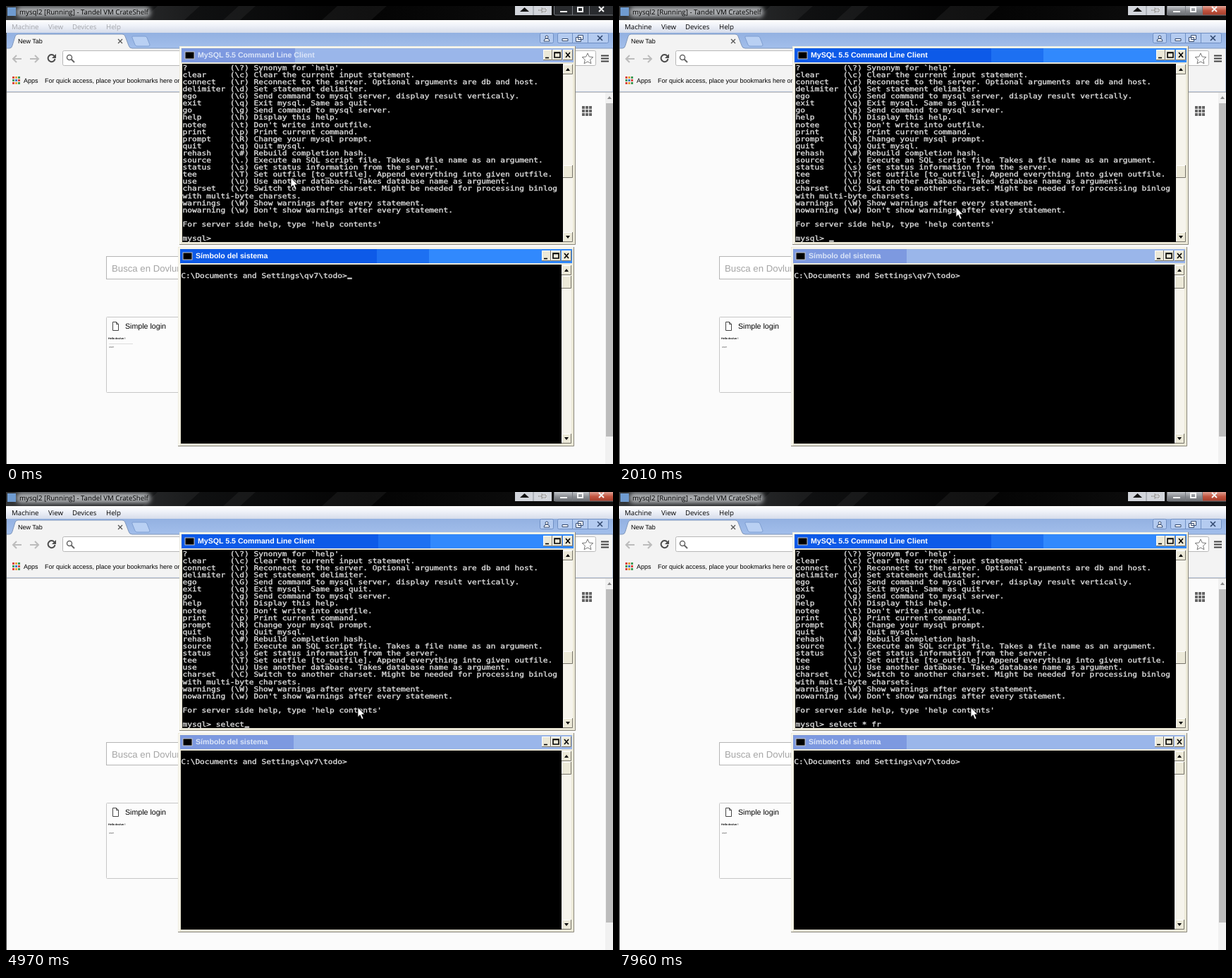
Animation, 861 px wide and 650 px high, one loop 8000 ms. Source, as an HTML page:

```html
<!DOCTYPE html>
<html lang="en">
<head>
<meta charset="utf-8">
<title>Console session</title>
<style>
html, body { margin: 0; width: 100%; height: 100%; overflow: hidden; background: #fbfbfb; }
svg { display: block; width: 861px; height: 650px; }
text { white-space: pre; text-rendering: geometricPrecision; font-family: "Liberation Sans", Arial, sans-serif; }
.menu, .caption { font: 9.7px "Open Sans", "Noto Sans", sans-serif; }
.small { font-size: 9px; }
.title { font-size: 10.6px; font-weight: bold; }
.mono { font: 11.18px "DejaVu Sans Mono", monospace; fill: #dcdcdc; stroke: #dcdcdc; stroke-width: .4; }
.off .active, .on .idle { display: none; }
.on .title { fill: #fff; }
.off .title { fill: #dbe5f8; }
.on .menu { fill: #000; }
.off .menu { fill: #a3a5aa; }
</style>
</head>
<body>
<svg id="stage" viewBox="0 0 861 650" xmlns="http://www.w3.org/2000/svg">
<defs>
  <linearGradient id="menuBg" x2="0" y2="1">
    <stop stop-color="#fff"/><stop offset=".45" stop-color="#eef1f8"/><stop offset="1" stop-color="#d6dcea"/>
  </linearGradient>
  <linearGradient id="glass">
    <stop stop-color="#343638"/><stop offset=".3" stop-color="#101112"/>
    <stop offset=".6" stop-color="#040404"/><stop offset="1" stop-color="#101010"/>
  </linearGradient>
  <linearGradient id="tabs" x2="0" y2="1">
    <stop stop-color="#93b1e1"/><stop offset="1" stop-color="#a3bfec"/>
  </linearGradient>
  <linearGradient id="steel" x2="0" y2="1">
    <stop stop-color="#c2c5c9"/><stop offset=".5" stop-color="#8b8e93"/><stop offset="1" stop-color="#696c71"/>
  </linearGradient>
  <linearGradient id="red" x2="0" y2="1">
    <stop stop-color="#dfa295"/><stop offset=".5" stop-color="#c2543f"/><stop offset="1" stop-color="#a23c2a"/>
  </linearGradient>
  <filter id="blur" x="-10%" y="-80%" width="120%" height="260%"><feGaussianBlur stdDeviation="3"/></filter>
</defs>

<!-- Host window -->
<g id="host">
  <rect width="861" height="20" fill="url(#glass)"/>
  <path d="M215 0h60l-22 20h-60zM330 0h24l-22 20h-24zM470 0h70l-22 20h-70z" fill="#fff" opacity=".05"/>
  <rect x="15" y="1" width="190" height="15" rx="6" fill="#a9abae" filter="url(#blur)"/>
  <rect x="2" y="2" width="12" height="12" fill="#6f9bd0"/>
  <text class="caption" x="19" y="12">mysql2 [Running] - Tandel VM CrateShelf</text>
  <rect x="722" width="52" height="13" fill="#d2d5db"/>
  <path d="M748 0v13" stroke="#8c9098"/>
  <path d="M729 8l6.500-6 6.500 6z" fill="#111"/>
  <path d="M756 6h4m0-4v8m0-6h6v4h-6" fill="none" stroke="#fff" stroke-width="2"/>
  <path d="M755 6h5m0-4v8m0-6h6v4h-6" fill="none" stroke="#777"/>
  <path d="M777 -2h84v13q0 2-2 2h-80q-2 0-2-2z" fill="#292b2e"/>
  <g class="active">
    <rect x="777" width="51" height="13" fill="url(#steel)"/>
    <rect x="828" width="33" height="13" fill="url(#red)"/>
  </g>
  <path d="M777.500 0v11q0 2 2 2h82M803.500 0v13M827.500 0v13" fill="none" stroke="#777a80"/>
  <path d="M786 8h10M811 2h7v6h-7zM841 1l7 7m0-7l-7 7" fill="none" stroke="#f4f4f4" stroke-width="2"/>
  <rect y="20" width="861" height="18" fill="url(#menuBg)"/>
  <text class="menu" x="8" y="33">Machine</text><text class="menu" x="60" y="33">View</text>
  <text class="menu" x="94" y="33">Devices</text><text class="menu" x="142" y="33">Help</text>
</g>

<!-- Browser -->
<rect y="38" width="861" height="23" fill="url(#tabs)"/>
<path d="M0 60h5q3 0 4-4l4-13q1-3 4-3h148q3 0 4 3l5 13q1 4 5 4h682v62H0z" fill="#f3f3f3" stroke="#8098bd"/>
<path d="M180 43h17q2 0 3 2l4 10q0 2-2 2h-16q-2 0-3-2l-4-10q-1-2 1-2z" fill="#b9d0f3" stroke="#7f9fd2"/>
<text class="small" x="17" y="53">New Tab</text>
<path d="M159 47l6 6m0-6l-6 6" stroke="#555" stroke-width="1.300"/>
<g fill="#b4cbf0" stroke="#6f8fc4">
  <rect x="757.500" y="38.500" width="19" height="14" rx="2"/><rect x="782.500" y="38.500" width="72" height="14" rx="2"/>
  <path d="M803.500 39v14M825.500 39v14"/>
</g>
<g fill="#fff" stroke="#33496f">
  <path d="M763 50q0-4 4-4t4 4z"/><circle cx="767" cy="44" r="2"/>
  <path d="M789 46.500h8v3h-8zM811.500 41.500h7v6h-7zM808.500 44.500h7v6h-7z"/>
  <path d="M839 42l7 7m0-7l-7 7" stroke-width="1.600"/>
</g>
<g fill="none" stroke="#bcbcbc" stroke-width="2">
  <path d="M22 75H10m5-5l-5 5 5 5M34 75h12m-5-5l5 5-5 5"/>
  <path d="M68.500 71a5 5 0 1 0 1 4" stroke="#4c4c4c"/>
</g>
<path d="M71 68v6h-6z" fill="#4c4c4c"/>
<rect x="80.500" y="63.500" width="756" height="21" rx="2" fill="#fff" stroke="#b7b7b7"/>
<circle cx="90" cy="73" r="3.500" fill="none" stroke="#666" stroke-width="1.500"/>
<path d="M92.500 75.500l4.500 4.500" stroke="#666" stroke-width="2"/>
<path d="M825 67l2.300 5 5.500.6-4.100 3.700 1.200 5.400-4.900-2.800-4.900 2.800 1.200-5.400-4.100-3.700 5.500-.6z" fill="#fff" stroke="#777"/>
<path d="M844 70.500h11M844 74.500h11M844 78.500h11" stroke="#444" stroke-width="2.200"/>
<text class="small" x="25" y="109">Apps</text>
<text class="small" x="55" y="109">For quick access, place your bookmarks here on the bar.</text>

<!-- Page -->
<path d="M0 122.500h861" stroke="#bdbdbd"/>
<rect y="123" width="861" height="527" fill="#fbfbfb"/>
<g id="apps"></g>
<path d="M.5 38v612" stroke="#444"/>
<rect x="850" y="123" width="11" height="527" fill="#f1f1f1"/>
<rect x="851" y="138" width="10" height="473" fill="#bcbcbc"/>
<path d="M853 132l3-4 3 4z" fill="#888"/>
<rect x="142.500" y="355.500" width="420" height="32" fill="#fff" stroke="#b5b5b5"/>
<text x="150" y="377" font-size="13.200" fill="#a5a5a5">Busca en Dovlun</text>
<rect x="142.500" y="441.500" width="130" height="107" rx="1" fill="#fcfcfc" stroke="#c6c6c6"/>
<path d="M151.500 448.500h5l3 3v9h-8zM156.500 448.500v3h3" fill="#fff" stroke="#444"/>
<text x="169" y="458" font-size="10.650">Simple login</text>
<text x="145" y="473" font-size="3.700" font-weight="bold">Hello dovlun !</text>
<path id="rule" d="M146 479.500h34" stroke="#ddd"/>
<text x="146" y="485" font-size="3.500" fill="#444">user</text>

<g id="windows"></g>
<g id="shell"></g>
<path id="pointer" d="M0 0v14l3.200-3 2.500 6 2.500-1-2.500-5.700h4.300z" fill="#fff" stroke="#000" stroke-width=".8"/>
</svg>
<script>
const $ = id => document.getElementById(id);
const LOOP = 8000, CELL = 6.73, ROW = 10.1, SQUASH = 0.86;
const LEFT = 250.6, BASE = 90.7, PROMPT_ROW = 24;

const help = [
  "?|?|Synonym for `help'.",
  "clear|c|Clear the current input statement.",
  "connect|r|Reconnect to the server. Optional arguments are db and host.",
  "delimiter|d|Set statement delimiter.",
  "ego|G|Send command to mysql server, display result vertically.",
  "exit|q|Exit mysql. Same as quit.",
  "go|g|Send command to mysql server.",
  "help|h|Display this help.",
  "notee|t|Don't write into outfile.",
  "print|p|Print current command.",
  "prompt|R|Change your mysql prompt.",
  "quit|q|Quit mysql.",
  "rehash|#|Rebuild completion hash.",
  "source|.|Execute an SQL script file. Takes a file name as an argument.",
  "status|s|Get status information from the server.",
  "tee|T|Set outfile [to_outfile]. Append everything into given outfile.",
  "use|u|Use another database. Takes database name as argument.",
  "charset|C|Switch to another charset. Might be needed for processing binlog",
  "with multi-byte charsets.",
  "warnings|W|Show warnings after every statement.",
  "nowarning|w|Don't show warnings after every statement.",
  "",
  "For server side help, type 'help contents'"
].map(line => {
  const [name, key, note] = line.split("|");
  return key ? `${name.padEnd(10)}(\\${key}) ${note}` : line;
});

const rect = (x, y, w, h, fill, extra = "") =>
  `<rect x="${x}" y="${y}" width="${w}" height="${h}" fill="${fill}" ${extra}/>`;

const mono = (x, y, str, id = "") =>
  `<text class="mono" ${id && `id="${id}"`} xml:space="preserve" transform="translate(${x} ${y}) scale(1 ${SQUASH})">${str.replace(/>/g, "&gt;")}</text>`;

// Beige raised button with an optional glyph path drawn from its corner
const button = (x, y, w, h, glyph = "") =>
  rect(x, y, w, h, "#ece9d8") +
  `<path d="M${x + .5} ${y + h}V${y + .5}H${x + w}" fill="none" stroke="#fff"/>` +
  `<path d="M${x + w - .5} ${y}V${y + h - .5}H${x}" fill="none" stroke="#77746a"/>` +
  `<path transform="translate(${x} ${y})" d="${glyph}" fill="none" stroke="#000" stroke-width="1.6"/>`;

const arrow = (x, y, dir) =>
  button(x, y, 14, 14) + `<path d="M${x + 4} ${y + 7 - dir * 2}h6l-3 ${dir * 4}z"/>`;

function consoleWindow({ id, x, y, w, h, pad, label, labelX, thumb, thumbH }) {
  const barY = y + 3, barX = x + 3, barW = w - 6, right = x + w;
  const inX = x + pad, inY = y + 25, inH = h - 29, scrollX = right - 18;
  const step = (from, fill) => rect(from, barY, barX + barW - from, 20, fill);
  return `<g id="${id}">` +
    rect(x, y, w, h, "#ece9d8") +
    `<path d="M${x + 1.5} ${y + h - 1}V${y + 1.5}H${right - 1}" fill="none" stroke="#fff"/>` +
    `<path d="M${right - .5} ${y}V${y + h - .5}H${x}" fill="none" stroke="#8a877c"/>` +
    `<g class="active">${step(barX, "#0d5ae8")}${step(x + 282, "#1d70f2")}${step(x + 356, "#3189fd")}</g>` +
    `<g class="idle">${step(barX, "#7d99e0")}${step(x + 164, "#9ab6ea")}</g>` +
    rect(labelX - 18, barY + 5, 13, 10, "#000", 'stroke="#c8c8c8"') +
    `<text class="title" x="${labelX}" y="${barY + 13}">${label}</text>` +
    button(right - 46, barY + 2, 13, 15, "M3 11.500h5") +
    button(right - 33, barY + 2, 14, 15, "M3 4h8v7h-8zM3 4.500h8") +
    button(right - 18, barY + 2, 14, 15, "M4 4l6 7m0-7l-6 7") +
    rect(inX, inY, scrollX - inX, inH, "#000") +
    rect(scrollX, inY, 14, inH, "#f6f4ec") +
    arrow(scrollX, inY + 1, -1) + arrow(scrollX, inY + inH - 14, 1) +
    button(scrollX, thumb, 14, thumbH) + "</g>";
}

$("apps").innerHTML = Array.from({ length: 9 }, (_, i) => {
  const col = i % 3, row = Math.floor(i / 3);
  const tint = ["#d9453d", "#e8a33a", "#3f9b57", "#3f78d0"][(col + row * 2) % 4];
  return rect(9 + col * 4, 100 + row * 4, 3, 3, tint) + rect(817 + col * 5, 142 + row * 5, 4, 4, "#666");
}).join("");

$("windows").innerHTML =
  consoleWindow({ id: "client", x: 246, y: 57, w: 562, h: 282, pad: 4, labelX: 272,
    label: "MySQL 5.5 Command Line Client", thumb: 226, thumbH: 18 }) +
  consoleWindow({ id: "system", x: 244, y: 342, w: 562, h: 283, pad: 4, labelX: 269,
    label: "Símbolo del sistema", thumb: 383, thumbH: 18 });

const promptY = BASE + PROMPT_ROW * ROW;
$("shell").innerHTML =
  help.map((line, i) => mono(LEFT, BASE + i * ROW, line)).join("") +
  mono(LEFT, promptY, "", "prompt") +
  mono(248.2, 386.3, "C:\\Documents and Settings\\qv7\\todo>") +
  rect(0, 332.6, 6.6, 2, "#dcdcdc", 'id="caret"') +
  rect(484.2, 385.6, 6.6, 2, "#dcdcdc", 'id="systemCaret"');

const FOCUS = 260;
const command = "select * fr";
const keys = [3760, 3948, 4136, 4324, 4512, 4700, 6020, 6860, 7273, 7417, 7960];
// The caret flips between hidden and shown at each time
const blinks = [840, 1430, 2010, 2460, 2890, 3350, 3948, 4512, 4970, 5490, 6020, 6580, 7130, 7960];
const path = [
  [0, 404, 243.5], [1280, 421, 245], [1430, 439, 247], [1580, 454, 249],
  [1850, 467, 268], [2010, 478, 285.5], [2310, 489, 297], [2460, 498.5, 307], [2890, 499, 305.5]
];

const passed = (times, t) => times.filter(at => at <= t).length;
const show = (id, on) => $(id).setAttribute("visibility", on ? "visible" : "hidden");
const focus = (id, on) => $(id).setAttribute("class", on ? "on" : "off");

function draw(t) {
  const focused = t >= FOCUS, typed = passed(keys, t);
  focus("host", focused);
  focus("client", focused);
  focus("system", !focused);
  show("rule", !focused);
  show("systemCaret", !focused);
  $("prompt").textContent = "mysql> " + command.slice(0, typed);
  $("caret").setAttribute("x", LEFT + .4 + (7 + typed) * CELL);
  show("caret", passed(blinks, t) % 2);
  const [, x, y] = path[passed(path.map(p => p[0]), t) - 1];
  $("pointer").setAttribute("transform", `translate(${x} ${y})`);
}

const start = performance.now();
function tick() {
  draw((performance.now() - start) % LOOP);
  requestAnimationFrame(tick);
}
tick();
</script>
</body>
</html>
```
